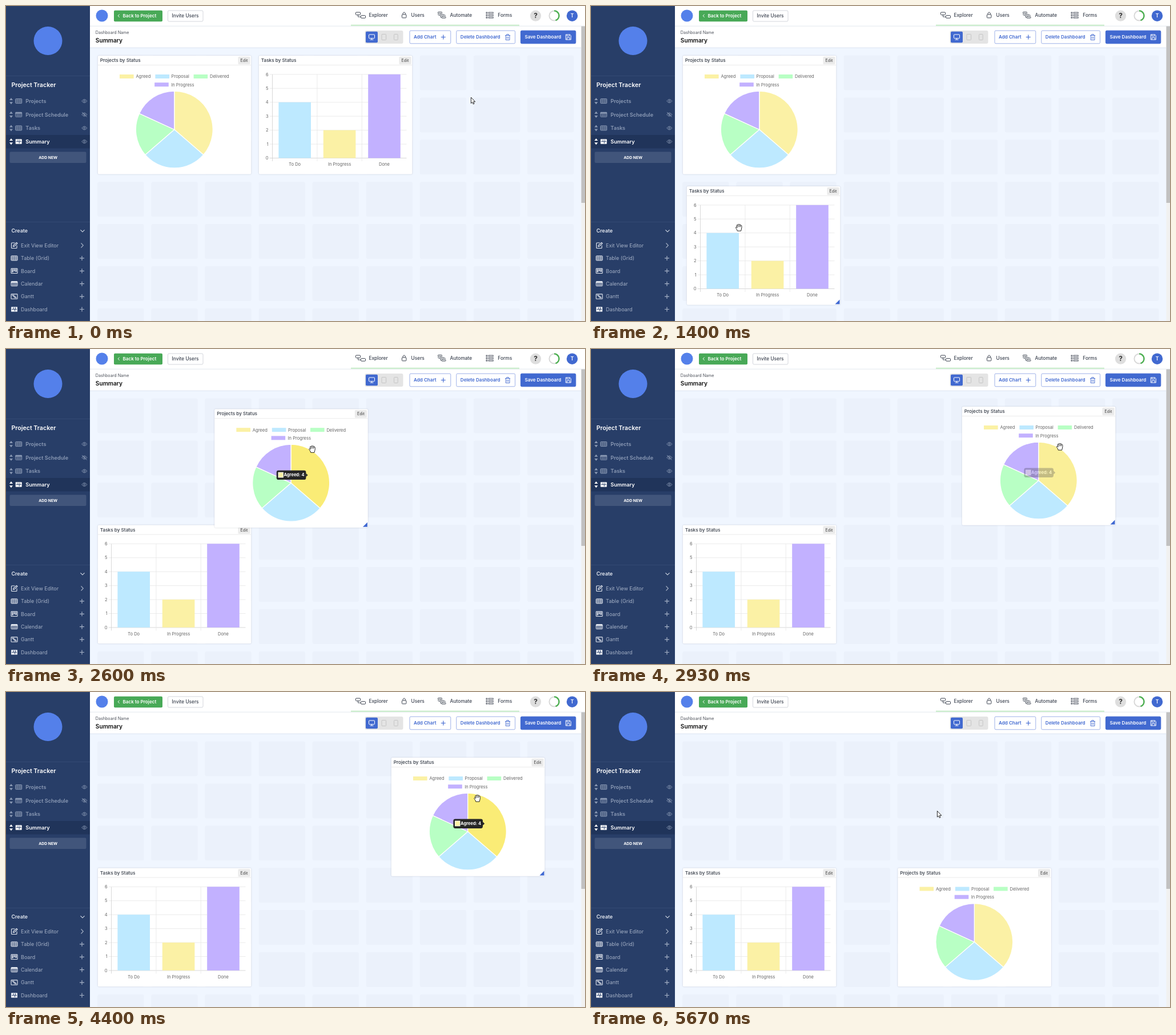
An HTML page for the animation above (6.94 s loop, 1014 by 552 pixels).

```html
<!DOCTYPE html>
<html lang="en">
<head>
<meta charset="utf-8">
<title>Dashboard editor</title>
<style>
html, body { margin: 0; width: 100%; height: 100%; overflow: hidden; background: #f0f6ff; }
svg { display: block; width: 1014px; height: 552px; font-family: Inter, sans-serif; }
.card { filter: drop-shadow(0 .8px 1.2px rgba(40, 50, 80, .22)); }
</style>
</head>
<body>
<svg id="stage" viewBox="0 0 1014 552"></svg>
<script>
const stage = document.getElementById('stage');
const LOOP = 6940, STEP = 1000 / 15;
const YELLOW = '#fbf1a5', BLUE = '#bde9ff', GREEN = '#b8ffc4', LILAC = '#c2b1ff';
const ACCENT = '#4169d0';

// Markup helpers
const rect = (x, y, w, h, fill, extra = '') =>
  `<rect x="${x}" y="${y}" width="${w}" height="${h}" fill="${fill}" ${extra}/>`;
const line = (d, color, width = 1, extra = '') =>
  `<path d="${d}" fill="none" stroke="${color}" stroke-width="${width}" ${extra}/>`;
const shape = (d, fill, extra = '') => `<path d="${d}" fill="${fill}" ${extra}/>`;
const circle = (x, y, r, fill, extra = '') =>
  `<circle cx="${x}" cy="${y}" r="${r}" fill="${fill}" ${extra}/>`;
const text = (x, y, s, size, fill, weight = 400, anchor = 'start') =>
  `<text x="${x}" y="${y}" font-size="${size}" fill="${fill}" font-weight="${weight}" text-anchor="${anchor}">${s}</text>`;
const at = (x, y, body) => `<g transform="translate(${x} ${y})">${body}</g>`;
const outline = (color, width = 1) => `stroke="${color}" stroke-width="${width}"`;

// Small icons, centred on 0,0
const icons = {
  table: c => rect(-5.5, -4, 11, 8, c, `fill-opacity=".35" rx=".8" ${outline(c)}`) +
    line('M-5-1.3H5M-5 1.3H5M-2-4V4M2-4V4', c, .4),
  calendar: c => rect(-5.5, -4, 11, 8, 'none', `rx=".8" ${outline(c)}`) +
    rect(-5.5, -4, 11, 2.6, c) +
    line('M-4 .1H4.4M-4 2.2H4.4', c, 1.2, 'stroke-dasharray="1.6 .6"'),
  dashboard: c => rect(-5.5, -4.2, 11, 8.4, c, 'rx=".8"') +
    line('M-4.5 0H4.5M-1.2-3.4V0M2-3.4V0M1 0V3.4', '#283e68', .9),
  board: c => rect(-5.5, -4.2, 11, 8.4, 'none', `rx=".8" ${outline(c, 1.1)}`) +
    rect(-4, -3, 2, 5.5, c) + rect(-1, -3, 2, 3.5, c) + rect(2, -3, 2, 4.6, c),
  gantt: c => rect(-5.5, -4.2, 11, 8.4, 'none', `rx=".8" ${outline(c, 1.1)}`) +
    line('M-4-2H0M-2 0H2.5M0 2H4', c, 1.4) + line('M-3-3L3.5 3', c, .6),
  edit: c => line('M1-4.5H-4.2Q-5-4.5-5-3.5V4Q-5 5-4 5H3.5Q4.5 5 4.5 4V0', c, 1.1) +
    line('M-2 2L-1.5-.2L4-5L5.5-3.5L.4 1.5Z', c, 1.1),
  eye: c => line('M-4.5 0Q0-6 4.5 0Q0 6-4.5 0Z', c, .9) + circle(0, 0, 1.4, 'none', outline(c, .9)),
  plus: c => line('M-4 0H4M0-4V4', c, 1.2),
  trash: c => line('M-4.5-3H4.5M-1.8-3V-4.8H1.8V-3M-3.4-3V5H3.4V-3M-1.2-.8V3M1.2-.8V3', c, .9),
  disk: c => line('M-4.5-4.5H2.8L4.5-2.8V4.5H-4.5ZM-2.5-4.5V-1.6H2V-4.5M-2.5 4.5V1H2.5V4.5', c, 1),
};
const icon = (name, x, y, c) => at(x, y, icons[name](c));

function sidebar() {
  const dim = '#8b9ab5', pale = '#a5b1c6';
  let s = rect(0, 0, 147, 552, '#283e68') + rect(0, 226, 147, 23.5, '#20345a') +
    line('M0 122.5H147M0 378.5H147', '#344a73') +
    circle(73.5, 61, 25, '#5480ea') +
    text(9.5, 142, 'Project Tracker', 10.6, '#fff', 600);
  [['Projects', 'table'], ['Project Schedule', 'calendar'], ['Tasks', 'table'], ['Summary', 'dashboard']]
    .forEach(([name, glyph], i) => {
      const y = 166.6 + i * 23.65, c = i === 3 ? '#fff' : dim;
      s += shape(`M6 ${y - 1.5}L9 ${y - 5.5}L12 ${y - 1.5}ZM6 ${y + 1.7}L9 ${y + 5.7}L12 ${y + 1.7}Z`, c) +
        icon(glyph, 22.2, y, c) + text(34.3, y + 3.4, name, 9.15, c, 600) + icon('eye', 137.3, y, dim);
      if (i === 1) s += line(`M133 ${y - 4}L141.5 ${y + 4}`, dim, 1);
    });
  s += rect(6.5, 255.5, 134, 19.5, '#41557b', 'rx="2"') +
    text(73.7, 267.8, 'ADD NEW', 6.8, '#fff', 700, 'middle') +
    text(9.5, 397, 'Create', 8.9, '#e6eaf1', 600) + line('M130.5 392.4L134 395.8L137.5 392.4', '#dbe1eb', 1.1);
  [['Exit View Editor', 'edit'], ['Table (Grid)', 'table'], ['Board', 'board'],
    ['Calendar', 'calendar'], ['Gantt', 'gantt'], ['Dashboard', 'dashboard']]
    .forEach(([name, glyph], i) => {
      const y = 419.5 + i * 22.4;
      s += icon(glyph, 14.5, y, '#e8ecf3') + text(26, y + 3.2, name, 9, pale);
      s += i ? icon('plus', 133, y, pale) : line(`M131.5 ${y - 4}L135.3 ${y}L131.5 ${y + 4}`, pale, 1.1);
    });
  return s;
}

function topbar() {
  const ink = '#3c4350';
  let s = rect(147, 0, 867, 73, '#fff') + line('M147 35.2H1014', '#e3e7ee') + line('M147 73.2H1007', '#dbe4f1') +
    rect(604, 32.6, 295, 2.4, '#cdeecf') + circle(168, 17, 10.5, '#5480ea') +
    rect(189, 7.8, 85, 19.4, '#48a957', 'rx="2"') + line('M198.6 14.6L196.2 17.2L198.6 19.8', '#fff', 1) +
    text(204.5, 20.1, 'Back to Project', 8.1, '#fff', 600) +
    rect(283.5, 8, 61.5, 19, '#fff', `rx="2" ${outline('#d3d6dc')}`) +
    text(290.6, 20.4, 'Invite Users', 8.3, ink, 500);
  s += rect(612.5, 11, 8, 4.6, 'none', `rx="1" ${outline(ink)}`) + line('M616.5 15.6V19H621', ink, .9) +
    rect(621.5, 16.6, 8, 4.6, 'none', `rx="1" ${outline(ink)}`);
  s += rect(693.5, 14.8, 7.4, 6, 'none', `rx="1" ${outline(ink)}`) + line('M695 14.8V13Q697.2 8.8 699.4 13V14.8', ink, 1);
  for (const [x, y] of [[756.5, 10.4], [759.5, 14.6], [763, 18.8]])
    s += rect(x, y, 7, 2.4, 'none', `rx=".8" ${outline(ink, .9)}`);
  s += line('M757 13V16H759M767 15.8H769V18M761 17V20H763', ink, .7);
  for (const y of [11, 15.1, 19.2])
    s += rect(841, y, 2, 2, 'none', outline(ink, .8)) + rect(845.2, y, 8, 2, 'none', outline(ink, .8));
  [[635.4, 'Explorer'], [709.5, 'Users'], [777.6, 'Automate'], [861.3, 'Forms']]
    .forEach(([x, name]) => s += text(x, 19.3, name, 8.4, ink, 500));
  s += circle(927.5, 17.2, 9.6, '#dedede') + text(927.5, 21.4, '?', 12, '#333', 700, 'middle') +
    circle(960, 17, 8.6, '#fff', outline('#d9d9d9', 2)) +
    line('M960 8.4A8.6 8.6 0 0 1 962.5 25.2', '#4caf50', 2.4) +
    circle(991.5, 17.2, 9.7, ACCENT) + text(991.5, 20.4, 'T', 8.6, '#fff', 600, 'middle');

  s += text(156.8, 48.8, 'Dashboard Name', 7.15, '#4b4f58') + text(156.8, 64.2, 'Summary', 10.2, '#111', 600);
  s += rect(628.5, 43, 67, 23, '#e4e4e4', 'rx="3"') + rect(630, 44.8, 21, 19.4, ACCENT, 'rx="2"') +
    rect(635.5, 50, 10, 6.6, 'none', `rx=".8" ${outline('#fff')}`) + line('M637.5 59H643.5M640.5 56.5V59', '#fff') +
    rect(658, 49.5, 7.6, 10, 'none', `rx="1" ${outline('#c5c5c5')}`) +
    rect(679.6, 49.5, 6.6, 10, 'none', `rx="1" ${outline('#c5c5c5')}`);
  const button = (x, w, label, glyph, fill, ink) =>
    rect(x, 43.2, w, 22.6, fill, `rx="2" ${outline(ink === '#fff' ? fill : '#9db1e8')}`) +
    text(x + 7, 57.4, label, 8.1, ink, 600) + icon(glyph, x + w - 13, 54.5, ink);
  s += button(707, 71.8, 'Add Chart', 'plus', '#fff', ACCENT) +
    button(788.8, 102.8, 'Delete Dashboard', 'trash', '#fff', ACCENT) +
    button(901.4, 96.4, 'Save Dashboard', 'disk', ACCENT, '#fff');
  return s + rect(1007.5, 35.5, 6.5, 517, '#f1f1f1') + rect(1007.5, 35.5, 6.5, 309.5, '#c1c1c1');
}

function cells() {
  let s = '';
  for (let row = 0; row < 7; row++)
    for (let col = 0; col < 9; col++)
      s += rect(160.2 + col * 94.1, 86.5 + row * 73.9, 81.4, 61, '#ebf1fb', 'rx="3"');
  return s;
}

const card = (title, body) => rect(-.2, 0, 268.6, 207.8, '#fff', 'rx="2"') + line('M0 16.5H268', '#e6e6e6', .8) +
  text(3.8, 11.1, title, 8.2, '#333a45', 500) + rect(245.5, 1.8, 21, 13.4, '#ebebeb', 'rx="1.5"') +
  text(256, 11.2, 'Edit', 7.05, '#555', 500, 'middle') + body +
  '<path class="handle" d="M267.5 198.5V206.5H259.5Z" fill="#3f68d2"/>';

const CX = 133.8, CY = 129.5, R = 67.5;
function slice(from, to, fill, extra = '') {
  const p = n => {
    const a = n / 11 * 2 * Math.PI;
    return `${CX + R * Math.sin(a)} ${CY - R * Math.cos(a)}`;
  };
  return shape(`M${CX} ${CY}L${p(from)}A${R} ${R} 0 0 1 ${p(to)}Z`, fill, `${outline('#fff', 1.3)} ${extra}`);
}

function pieBody() {
  let s = '';
  [[38, 33, 66.4, 'Agreed', YELLOW], [100.4, 33, 128.6, 'Proposal', BLUE],
    [167.6, 33, 196, 'Delivered', GREEN], [99.2, 47.2, 128.2, 'In Progress', LILAC]]
    .forEach(([x, y, tx, name, c]) => s += rect(x, y, 24.6, 7, c) + text(tx, y + 6.4, name, 7.55, '#666'));
  s += slice(0, 4, YELLOW) + slice(4, 7, BLUE) + slice(7, 9, GREEN) + slice(9, 11, LILAC);
  return s + '<g id="tip">' + slice(0, 4, '#faec76') +
    rect(108.4, 107.5, 51.6, 16.4, '#262626', 'rx="3.4"') + shape('M160 112.6L163.2 115.7L160 118.8Z', '#262626') +
    rect(111.6, 111, 8.4, 8.8, YELLOW, outline('#fff', .9)) +
    text(121, 118.3, 'Agreed: 4', 7.5, '#fff', 700) + '</g>';
}

function barBody() {
  const x0 = 23.5, base = 179.5, unit = 24.45, span = 78.4;
  let s = '';
  for (let n = 0; n <= 6; n++) {
    const y = base - n * unit;
    s += line(`M18.5 ${y}H258.5`, n ? '#e6e6e6' : '#cfcfcf', .8) + text(16.6, y + 2.7, n, 7.55, '#666', 400, 'end');
  }
  for (let i = 0; i < 3; i++) s += line(`M${x0 + i * span} 33V185`, i ? '#e6e6e6' : '#cfcfcf', .8);
  [['To Do', 4, BLUE], ['In Progress', 2, YELLOW], ['Done', 6, LILAC]].forEach(([name, n, c], i) => {
    const x = x0 + (i + .5) * span;
    s += rect(x - 28.3, base - n * unit, 56.6, n * unit, c) + text(x, 193.4, name, 7.55, '#666', 400, 'middle');
  });
  return s;
}

const ink = `stroke="#111" stroke-width=".9" stroke-linejoin="round" stroke-linecap="round"`;
const pointers = {
  arrow: shape('M.4 .4V10.6L2.7 8.5L4.3 12L6 11.2L4.4 7.8H7.4Z', '#fff', ink),
  hand: shape('M-2.8 5.8Q-3.2 3.6-5 1.6Q-6.2 0-5 -.6Q-4-.8-3 .6L-3.9-3.2Q-3.9-4.6-2.7-4.4L-1.8-3.6Q-1.9-5.6-.6-5.6' +
    'L.5-4.8Q1-6 2.1-5.1L2.6-3.7Q4-4.7 4.7-3.2Q5.4-.4 4.6 2L3.7 5.8Z', '#fff', ink) +
    line('M-1.8-3.5L-1.2-.6M.5-4.6L.8-.8M2.6-3.6L2.6-.7', '#111', .8),
  resize: shape('M0-6.3L3-3H1V3H3L0 6.3L-3 3H-1V-3H-3Z', '#fff', ink),
};

stage.innerHTML = cells() + '<g id="cards">' +
  `<g id="bars" class="card">${card('Tasks by Status', barBody())}</g>` +
  `<g id="pie" class="card">${card('Projects by Status', pieBody())}</g></g>` +
  sidebar() + topbar() + '<g id="pointer">' +
  Object.entries(pointers).map(([k, v]) => `<g id="${k}">${v}</g>`).join('') + '</g>';

const el = id => document.getElementById(id);
const cards = el('cards'), bars = el('bars'), pie = el('pie'), tip = el('tip'), pointer = el('pointer');

// Key poses: [step, values...]
const barKeys = [[8, 443, 87], [10, 438, 112], [12, 420, 180], [15, 380, 264.5], [19, 229, 311],
  [21, 168, 316], [23, 166, 315], [25, 161, 308.5]];
const pieKeys = [[34, 161, 87], [36, 210, 95], [41, 469, 112], [44, 650, 101], [46, 700, 86], [47, 707, 84],
  [49, 707, 87], [52, 726, 87], [64, 726, 87], [66, 675, 115], [70, 514, 257.5], [71, 509, 274],
  [75, 542, 297], [77, 537.5, 308.5]];
const pointerKeys = [[0, 814, 160], [3, 690, 129], [6, 547, 158], [8, 547, 158], [23, 257, 387], [25, 257, 387],
  [30, 272, 315], [31, 275.5, 284], [34, 332, 157], [48, 878, 157], [76, 693, 368], [78, 693, 368],
  [80, 675, 335], [85, 606, 208.5]];
const tipKeys = [[34, 0], [38, 1], [42, 1], [44, .26], [45, 0], [48, 0], [53, 1], [78, 1], [82, 0]];

function pose(keys, f) {
  const i = keys.findIndex(k => k[0] > f);
  if (i === 0) return keys[0].slice(1);
  if (i < 0) return keys[keys.length - 1].slice(1);
  const a = keys[i - 1], b = keys[i], u = (f - a[0]) / (b[0] - a[0]);
  return a.slice(1).map((v, n) => v + (b[n + 1] - v) * u);
}
const move = (node, [x, y]) => node.setAttribute('transform', `translate(${x} ${y})`);
const show = (node, on) => node.setAttribute('visibility', on ? 'visible' : 'hidden');

function pointerPose(f, barPos, piePos) {
  const held = ([x, y], dx, dy) => [x + dx, y + dy];
  if (f >= 9 && f < 23) return held(barPos, 91, 72);
  if (f >= 34 && f < 49) return held(piePos, 171, 70);
  if (f >= 49 && f < 65) return [878, 157];
  if (f >= 65 && f < 76) return held(piePos, 150.5, 71);
  return pose(pointerKeys, f);
}

function draw(t) {
  const f = Math.floor((t + 4) / STEP);
  const barPos = pose(barKeys, f), piePos = pose(pieKeys, f);
  const top = f < 31 ? bars : pie;
  if (cards.lastChild !== top) cards.append(top);
  move(bars, barPos);
  move(pie, piePos);
  tip.setAttribute('opacity', pose(tipKeys, f)[0]);
  show(bars.querySelector('.handle'), f >= 3 && f < 31);
  show(pie.querySelector('.handle'), f >= 32 && f < 82);
  const kind = f < 3 || f >= 82 ? 'arrow' : f === 31 ? 'resize' : 'hand';
  for (const k in pointers) show(el(k), k === kind);
  move(pointer, pointerPose(f, barPos, piePos));
}

const start = performance.now();
function tick() {
  draw((performance.now() - start) % LOOP);
  requestAnimationFrame(tick);
}
tick();
</script>
</body>
</html>
```
